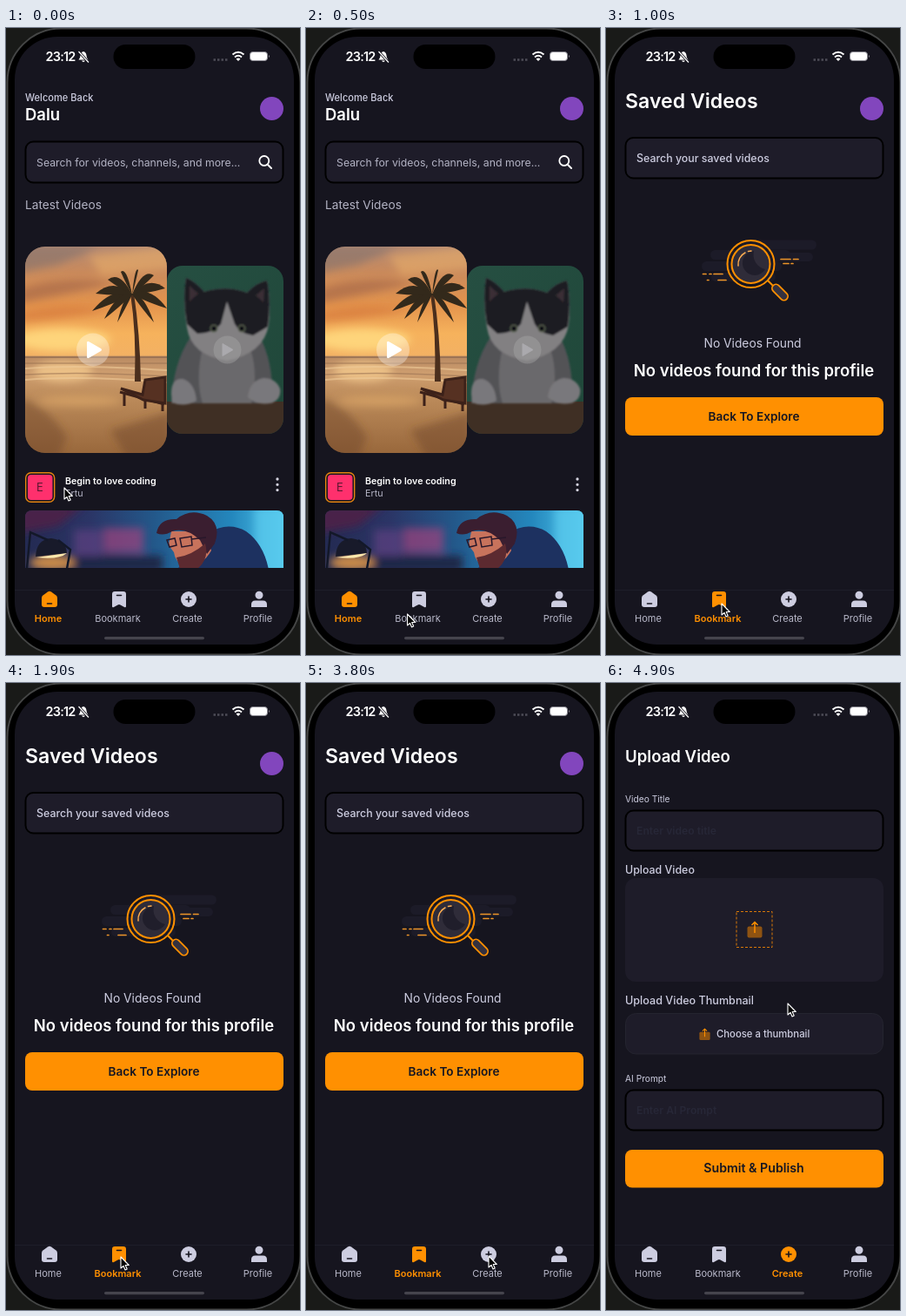
Write an HTML page that moves like this. It is 338x720 px and loops after 5 s.

```html
<!DOCTYPE html>
<html lang="en">
<head>
<meta charset="utf-8">
<title>Video app</title>
<style>
html, body { margin: 0; width: 100%; height: 100%; overflow: hidden; background: #000; }
svg { display: block; width: 100vw; height: 100vh; }
text { font-family: Inter, "Open Sans", sans-serif; fill: #cdcde0; }
.w { fill: #fff; font-weight: 600; }
.m { font-weight: 500; }
.mid { text-anchor: middle; }
.dim { fill: #b3b3c4; }
.dark { fill: #161622; font-weight: 600; }
.hint { fill: #272737; font-weight: 600; }
.panel { fill: #1e1c29; }
.field { fill: #1e1c29; stroke: #000; stroke-width: 2; }
.btn { fill: #ff9001; }
.line { fill: none; stroke: #ff9001; stroke-width: 2; stroke-linecap: round; }
</style>
</head>
<body>
<svg viewBox="0 0 338 720" xmlns="http://www.w3.org/2000/svg">
<defs>
  <linearGradient id="sky" x2="0" y2="1">
    <stop offset="0" stop-color="#b58a72"/><stop offset=".12" stop-color="#c98a5c"/>
    <stop offset=".28" stop-color="#e3934c"/><stop offset=".42" stop-color="#f6b25c"/>
    <stop offset=".525" stop-color="#f3b163"/><stop offset=".535" stop-color="#b98a62"/>
    <stop offset=".62" stop-color="#cf9f70"/><stop offset=".7" stop-color="#c08f5e"/>
    <stop offset="1" stop-color="#99683c"/>
  </linearGradient>
  <linearGradient id="wall" x2="1" y2="1">
    <stop offset="0" stop-color="#264f42"/><stop offset="1" stop-color="#1f4739"/>
  </linearGradient>
  <linearGradient id="room">
    <stop offset="0" stop-color="#232a52"/><stop offset=".25" stop-color="#2b3566"/>
    <stop offset=".5" stop-color="#23588a"/><stop offset=".8" stop-color="#2487bd"/>
    <stop offset="1" stop-color="#4fc4ea"/>
  </linearGradient>
  <filter id="soft" x="-50%" y="-50%" width="200%" height="200%"><feGaussianBlur stdDeviation="5"/></filter>
  <filter id="haze"><feGaussianBlur stdDeviation="1"/></filter>
  <clipPath id="cardA"><rect x="22" y="251" width="163" height="237" rx="23"/></clipPath>
  <clipPath id="cardB"><rect x="185" y="273" width="134" height="193" rx="18"/></clipPath>
  <clipPath id="thumb"><path d="M22 620V562Q22 554 30 554H311Q319 554 319 562V620Z"/></clipPath>
  <g id="upload">
    <rect x="-8.5" y="-4.5" width="17" height="13" rx="2" fill="#8e5312"/>
    <path d="M0 3V-9M-3.5 -6L0 -9.5L3.5 -6" fill="none" stroke="#ff9001" stroke-width="1.5"/>
  </g>
</defs>

<rect width="338" height="720" fill="#191a18"/>
<rect x="1.5" y=".5" width="337" height="719" rx="62" fill="#000" stroke="#454646" stroke-width="2"/>
<rect x="10" y="10" width="321" height="698" rx="49" fill="#16151f"/>
<rect x="123.5" y="19" width="94" height="28" rx="14" fill="#000"/>

<g fill="#fff">
  <text class="w" x="45.500" y="38" font-size="14.500" letter-spacing="-.8">23:12</text>
  <path d="M83.500 36.500Q85.500 34.500 85.500 31.500Q86 27.500 89 27Q92 27.500 92.500 31.500Q92.500 34.500 94.500 36.500ZM87 37.500H91Q89 40.500 87 37.500Z"/>
  <path d="M83.500 27L95 39.500" stroke="#16151f" stroke-width="3"/>
  <path d="M83.500 27L95 39.500" stroke="#fff" stroke-width="1.200"/>
  <path d="M238.500 36.500H255" stroke="#4d4c57" stroke-width="2.500" stroke-dasharray="2.500 2"/>
  <path d="M260.500 30.500Q267 25 273.500 30.500M263 33.500Q267 30 271 33.500" fill="none" stroke="#fff" stroke-width="2"/>
  <path d="M264.500 35.500Q267 33.700 269.500 35.500L267 38Z"/>
  <rect x="280.500" y="27.500" width="20" height="10" rx="3.300" stroke="#8b8a92"/>
  <path d="M302 31Q304 32.500 302 34Z" fill="#8b8a92"/>
</g>
<circle id="mark" cx="305.500" cy="92.500" r="13.500" fill="#8246bd"/>

<g id="home">
  <text class="m" x="22" y="84" font-size="11.100">Welcome Back</text>
  <text class="w" x="22" y="105.500" font-size="18.500">Dalu</text>
  <rect class="field" x="22.500" y="130.500" width="296" height="47" rx="9"/>
  <text class="dim" x="35" y="159" font-size="12.300">Search for videos, channels, and more...</text>
  <path d="M301 157L305 161" stroke="#fff" stroke-width="2" stroke-linecap="round"/>
  <circle cx="296.800" cy="152.500" r="5.500" fill="none" stroke="#fff" stroke-width="1.800"/>
  <text class="dim" x="22" y="208" font-size="13.700">Latest Videos</text>

  <g clip-path="url(#cardA)">
    <rect x="22" y="251" width="163" height="237" fill="url(#sky)"/>
    <g filter="url(#soft)">
      <path d="M10 250H110L60 272L10 282Z" fill="#82706d" opacity=".6"/>
      <path d="M95 262L190 250V276L110 284Z" fill="#e8ad6c" opacity=".6"/>
      <path d="M15 300Q60 284 125 292Q80 304 15 316Z" fill="#a4674a" opacity=".65"/>
      <path d="M15 326Q70 314 120 324Q70 334 15 338Z" fill="#d2733a" opacity=".6"/>
      <ellipse cx="65" cy="358" rx="55" ry="13" fill="#ffd97f" opacity=".9"/>
      <ellipse cx="66" cy="394" rx="34" ry="12" fill="#f3c98c" opacity=".8"/>
      <path d="M15 425Q50 435 70 470L60 495H15ZM190 440L120 462L140 495H190Z" fill="#704829" opacity=".5"/>
      <ellipse cx="85" cy="428" rx="48" ry="6" fill="#d9a467" opacity=".8"/>
    </g>
    <path d="M22 378H185" stroke="#8f6a50" stroke-width="2" opacity=".7"/>
    <path d="M22 391Q80 386 185 393M22 404Q90 399 185 407" stroke="#f0cb99" stroke-width="2" fill="none" opacity=".6"/>
    <path d="M22 385H185M22 398Q90 394 185 400" stroke="#9a7252" stroke-width="1.500" fill="none" opacity=".6"/>
    <g id="palm" fill="#33291b"><path d="M143 305Q150 350 148 406H155Q154 350 147 305Z" fill="#4b2f1d"/></g>
    <g stroke="#3c2119" stroke-width="3" fill="none">
      <path d="M131 418L182 432M136 420V434M160 427V437M180 428V440"/>
      <path d="M132 414L157 421L160 404L183 401V431L158 427Z" fill="#563122"/>
    </g>
  </g>
  <circle cx="100" cy="369.500" r="19" fill="#fff" opacity=".32"/>
  <path d="M93 361.500Q93 359 95.500 360.300L109 368Q111 369.500 109 371L95.500 378.700Q93 380 93 377.500Z" fill="#fff"/>

  <g clip-path="url(#cardB)">
    <rect x="185" y="273" width="134" height="193" fill="url(#wall)"/>
    <rect x="185" y="429" width="134" height="40" fill="#3f2f24"/>
    <g filter="url(#haze)">
      <path d="M212 355Q192 385 190 431H306Q308 385 292 355Z" fill="#535257"/>
      <path d="M225 372Q218 405 226 431H282Q290 400 282 372Z" fill="#6b696c"/>
      <path d="M207 287Q216 290 228 303Q254 295 277 304Q289 292 300 290Q305 313 302 341Q296 374 254 382Q213 376 208 344Q203 316 207 287Z" fill="#828082"/>
      <path d="M207 287Q216 290 228 303Q254 295 277 304Q289 292 300 290Q305 313 301 343L284 353Q269 351 263 340L254 314L247 340Q238 351 220 351L208 340Q203 313 207 287Z" fill="#1d1c24"/>
      <path d="M211 296L221 305L211 314ZM297 299L287 307L296 315Z" fill="#3a2f35"/>
      <circle cx="239" cy="345" r="4.500" fill="#59614f"/><circle cx="271" cy="345" r="4.500" fill="#59614f"/>
      <circle cx="239" cy="345" r="3" fill="#101016"/><circle cx="271" cy="345" r="3" fill="#101016"/>
      <path d="M190 420Q190 402 203 403Q217 407 219 428Q205 436 191 430ZM278 424Q280 405 296 402Q310 402 315 414Q317 425 307 430Q290 435 278 424Z" fill="#79787b"/>
    </g>
  </g>
  <circle cx="254.500" cy="369.500" r="16" fill="#aaa" opacity=".38"/>
  <path d="M249 362.500L261 369.500L249 376.500Z" fill="#aaa9ad" stroke="#aaa9ad" stroke-linejoin="round"/>

  <rect x="22.700" y="510.700" width="33" height="33.500" rx="6" fill="#16151f" stroke="#e58410" stroke-width="1.400"/>
  <rect x="25" y="513" width="28.500" height="29" rx="4" fill="#ff306d"/>
  <text class="mid" x="39" y="532" font-size="13" style="fill:#59182f">E</text>
  <text class="w" x="68" y="523.500" font-size="10.700">Begin to love coding</text>
  <text class="dim" x="68" y="538" font-size="10.800">Ertu</text>
  <path d="M312 518V531.500" stroke="#d4d3df" stroke-width="3.300" stroke-linecap="round" stroke-dasharray="0 6.300"/>

  <g clip-path="url(#thumb)">
    <rect x="22" y="554" width="297" height="66" fill="url(#room)"/>
    <g filter="url(#soft)">
      <path d="M15 548H90L60 572L15 580Z" fill="#4a2148"/>
      <rect x="78" y="576" width="32" height="32" fill="#5f3f80" opacity=".7"/>
      <rect x="112" y="574" width="46" height="28" fill="#a8447f" opacity=".65"/>
      <rect x="70" y="606" width="110" height="18" fill="#1d2547"/>
      <ellipse cx="53" cy="614" rx="26" ry="9" fill="#c98a48"/>
      <rect x="286" y="550" width="40" height="75" fill="#5ccdf0" opacity=".7"/>
    </g>
    <path d="M232 580Q256 566 276 578Q296 592 302 622H196L216 602Z" fill="#1d3160"/>
    <path d="M190 578H228L236 600Q226 618 206 620Q194 612 193 602L187 594Z" fill="#c8735c"/>
    <path d="M173 580Q176 563 196 564Q212 551 231 560Q248 570 240 592L231 604L223 588Q207 573 191 578Q181 584 173 580Z" fill="#3a1e30"/>
    <path d="M196 608Q213 606 229 592Q234 610 220 621H200Z" fill="#5c2a30"/>
    <path d="M185 588L194 586L196 594L188 596ZM200 586L213 584L214 594L202 596ZM213 587L230 585" fill="none" stroke="#28172a" stroke-width="1.500"/>
    <path d="M34 607Q35 587 52 586Q69 588 70 603Z" fill="#181a2a"/>
    <path d="M35 608L70 603Q61 611 35 608Z" fill="#ffe9ad"/>
    <path d="M60 588L74 599L70 621M48 588L28 579L24 620" fill="none" stroke="#131829" stroke-width="2.500"/>
  </g>
</g>

<g id="saved">
  <text class="w" x="22" y="92" font-size="23.100">Saved Videos</text>
  <rect class="field" x="22.500" y="126" width="296" height="46.500" rx="9"/>
  <text class="m" x="35" y="154" font-size="12.400">Search your saved videos</text>
  <g fill="#1c1b28">
    <rect x="155" y="243.500" width="87" height="11" rx="5.500"/>
    <rect x="120" y="255" width="92" height="11" rx="5.500"/>
    <rect x="185" y="258" width="53" height="10" rx="5"/>
    <rect x="110" y="268" width="92" height="11" rx="5.500"/>
    <rect x="121" y="281" width="74" height="10" rx="5"/>
  </g>
  <circle class="line" cx="166.500" cy="271" r="27"/>
  <circle cx="166.500" cy="271" r="22" fill="#2f2c39"/>
  <path d="M170 256A14 14 0 1 0 183 277A17 17 0 0 1 170 256Z" fill="#201e2b"/>
  <circle class="line" cx="166.500" cy="271" r="22"/>
  <path d="M152 273A15 15 0 0 1 160 258M163.500 256.500L167 256" class="line" style="stroke:#ffad52;stroke-width:1.500"/>
  <path d="M186 290L191 295" class="line"/>
  <rect x="-11" y="-4.500" width="22" height="9" rx="4.500" transform="translate(200 303.500) rotate(45)" fill="#34313f" stroke="#ff9001" stroke-width="1.800"/>
  <path d="M111.500 282.500H115M119 282.500H121M124 282.500H134M116.500 289.500H118M129 289.500H138M201 265.500H212M215.500 265.500H221M204 270.500H210M213 270.500H215" class="line" style="stroke:#ed9528;stroke-width:1.700"/>
  <text class="mid" x="168.500" y="367" font-size="13.800">No Videos Found</text>
  <text class="mid w" x="170" y="399.500" font-size="18.500">No videos found for this profile</text>
  <rect class="btn" x="22" y="424" width="297" height="44" rx="8"/>
  <text class="mid dark" x="170" y="451" font-size="13.600">Back To Explore</text>
</g>

<g id="create">
  <text class="w" x="22" y="91" font-size="18.600">Upload Video</text>
  <text x="22" y="137" font-size="10.200">Video Title</text>
  <rect class="field" x="22.500" y="146.500" width="296" height="46" rx="9"/>
  <text class="hint" x="35" y="174" font-size="12.200">Enter video title</text>
  <text class="m" x="22" y="218.500" font-size="12.400">Upload Video</text>
  <rect class="panel" x="22" y="224" width="297" height="119" rx="12"/>
  <rect x="150" y="262.500" width="41" height="41" fill="none" stroke="#d87808" stroke-dasharray="3 2"/>
  <use href="#upload" x="171" y="284"/>
  <text class="m" x="22" y="369" font-size="12.600">Upload Video Thumbnail</text>
  <rect class="panel" x="22.500" y="379.500" width="296" height="46.500" rx="12" stroke="#24242f"/>
  <use href="#upload" transform="translate(113.500 404) scale(.72)"/>
  <text class="m" x="127" y="407" font-size="11.300">Choose a thumbnail</text>
  <text x="22" y="458" font-size="10.200">AI Prompt</text>
  <rect class="field" x="22.500" y="467.500" width="296" height="46" rx="9"/>
  <text class="hint" x="35" y="495" font-size="12.200">Enter AI Prompt</text>
  <rect class="btn" x="22" y="536" width="297" height="43.500" rx="8"/>
  <text class="mid dark" x="170" y="562" font-size="14.200">Submit &amp; Publish</text>
</g>

<path d="M10 645.500H331" stroke="#1e1e2a"/>
<g id="tabs"></g>
<rect x="113" y="699" width="115" height="3.200" rx="1.600" fill="#45444d"/>
<path id="cursor" d="M0 0V13L3 10.300L5 15L7.200 14L5.200 9.500H9.300Z" fill="#000" stroke="#fff" stroke-width="1.100" stroke-linejoin="round"/>
</svg>
<script>
const $ = id => document.getElementById(id);
const LOOP = 5000, STEP = 100;
const screens = [[0, "home"], [800, "saved"], [4000, "create"]];
const bar = "#16151f";

// label, icon centre, screen it opens, icon body, icon detail
const tabs = [
  ["Home", 50, "home", "M-2 -8.5Q0 -9.8 2 -8.5L7.5 -4.5Q9 -3.3 9 -1.5V6Q9 9 6 9H-6Q-9 9 -9 6V-1.5Q-9 -3.3 -7.5 -4.5Z", "M-2.5 5H2.5"],
  ["Bookmark", 130, "saved", "M-8 8V-6Q-8 -9 -5 -9H5Q8 -9 8 -6V8Q8 10 6 9L1.5 6.5Q0 5.7 -1.5 6.5L-6 9Q-8 10 -8 8Z", "M-2.5 -4.5H2.5"],
  ["Create", 210, "create", "M-9 0A9 9 0 1 1 9 0A9 9 0 1 1 -9 0Z", "M-3 0H3M0 -3V3"],
  ["Profile", 291, "", "M-4.5 -4.7A4.5 4.5 0 1 1 4.5 -4.7A4.5 4.5 0 1 1 -4.5 -4.7ZM-9 9V6Q-9 1.5 -4.5 1.5H4.5Q9 1.5 9 6V9Z", ""]
];
$("tabs").innerHTML = tabs.map(([label, x, , body, mark]) =>
  `<g><g transform="translate(${x} 656)"><path d="${body}"/>
  <path d="${mark}" stroke="${bar}" stroke-width="1.6" stroke-linecap="round"/></g>
  <text class="mid" x="${x - 1.5}" y="682" font-size="11">${label}</text></g>`).join("");

const fronds = [[99, 325], [103, 305], [117, 289], [132, 280], [152, 278], [170, 284], [183, 299], [185, 322], [170, 338], [128, 338], [113, 334]];
$("palm").innerHTML += fronds.map(([x, y]) => {
  const mx = (x + 145) / 2, my = (y + 306) / 2;
  return `<path d="M145 306Q${mx} ${my - 19} ${x} ${y}Q${mx} ${my + 2} 145 306Z"/>`;
}).join("");

// time, tip x, tip y
const path = [
  [0, 67, 528], [500, 116.5, 673], [700, 133, 661], [1800, 133, 661], [1900, 132, 659],
  [2000, 132, 659], [2600, 202, 661], [2800, 210, 658], [4600, 210, 658], [4900, 209, 368]
];

function pointer(t) {
  const i = path.findIndex(p => p[0] > t);
  if (i < 0) return path[path.length - 1].slice(1);
  const [t0, x0, y0] = path[i - 1], [t1, x1, y1] = path[i];
  const u = (t - t0) / (t1 - t0), e = u * u * (3 - 2 * u);
  return [x0 + (x1 - x0) * e, y0 + (y1 - y0) * e];
}

function draw(t) {
  const now = screens.filter(s => s[0] <= t).pop()[1];
  for (const [, id] of screens) $(id).style.display = id === now ? "" : "none";
  $("mark").style.display = now === "create" ? "none" : "";
  tabs.forEach((tab, i) => {
    const on = tab[2] === now, g = $("tabs").children[i], label = g.querySelector("text");
    g.setAttribute("fill", on ? "#ff9001" : "#cdcde0");
    label.style.fill = on ? "#ff9001" : "#b9b9ca";
    label.style.fontWeight = on ? 600 : 400;
  });
  $("cursor").setAttribute("transform", `translate(${pointer(t)})`);
}

const start = performance.now();
function tick() {
  const t = (performance.now() - start) % LOOP;
  draw(Math.floor(t / STEP) * STEP);
  requestAnimationFrame(tick);
}
tick();
</script>
</body>
</html>
```
